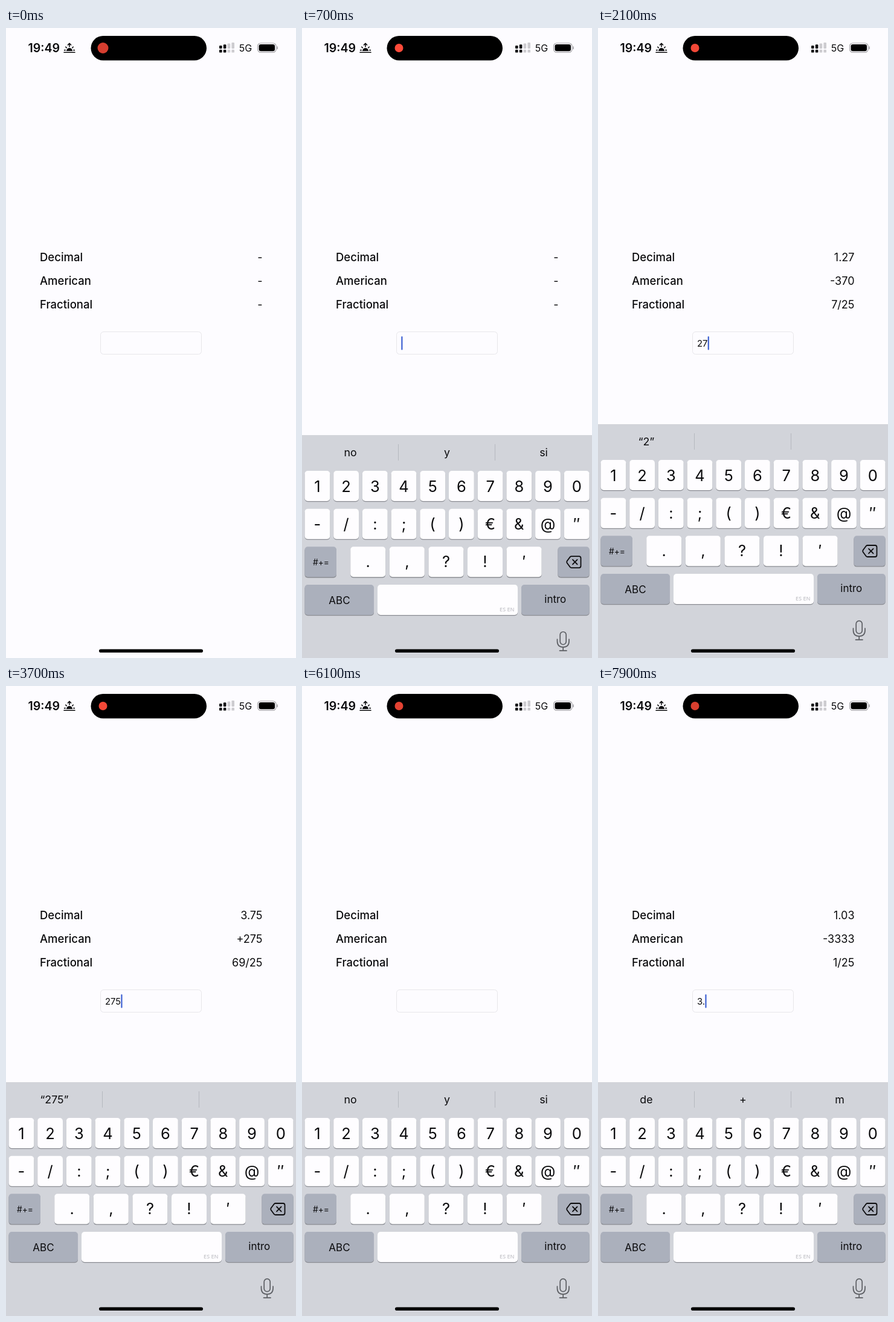
Recreate the animation shown at these times as an HTML page with a canvas. Size 480 by 1040 pixels, loop 8000 ms.

```html
<!DOCTYPE html>
<html lang="en">
<head>
<meta charset="utf-8">
<style>
html, body { margin: 0; width: 100%; height: 100%; overflow: hidden; background: #fdfcff; }
canvas { display: block; }
</style>
</head>
<body>
<canvas id="stage" width="480" height="1040"></canvas>
<script>
const ctx = document.getElementById('stage').getContext('2d');
const LOOP = 8000, PRESS = 100, LAG = 200, FOCUS = 475;
const INK = '#0b0b0d', WHITE = '#fefdff', GREY = '#abb0bc', PANEL = '#d2d4da';

// time of each entry, resulting field text, key pressed
const entries = [
  [1750, '2', '2'], [2000, '27', '7'], [2600, '275', '5'],
  [4900, '27', 'del'], [5200, '2', 'del'], [5600, '', 'del'],
  [6900, '3', '3'], [7600, '3.', '.']
];

const clamp = v => Math.max(0, Math.min(1, v));
const lastEntry = t => entries.filter(e => e[0] <= t).pop();

function text(s, x, y, size, { align = 'center', weight = 400, color = INK, family = 'Inter' } = {}) {
  ctx.font = `${weight} ${size}px "${family}", sans-serif`;
  ctx.textAlign = align;
  ctx.fillStyle = color;
  ctx.fillText(s, x, y);
}

function box(x, y, w, h, r, fill) {
  ctx.beginPath();
  ctx.roundRect(x, y, w, h, r);
  ctx.fillStyle = fill;
  ctx.fill();
}

function disc(x, y, r, fill) {
  ctx.beginPath();
  ctx.arc(x, y, r, 0, 7);
  ctx.fillStyle = fill;
  ctx.fill();
}

function stroke(d, color, width) {
  ctx.strokeStyle = color;
  ctx.lineWidth = width;
  ctx.lineCap = ctx.lineJoin = 'round';
  ctx.stroke(new Path2D(d));
}

function statusBar(t) {
  text('19:49', 36.5, 40, 19.6, { align: 'left', weight: 600 });
  stroke('M96 40.2H114M105 31V26M102.4 28L105 25.4L107.6 28M98.8 31.2L100.2 32.6M111.2 31.2L109.8 32.6M96.6 36.6H98.2M111.8 36.6H113.4', INK, 1.6);
  ctx.fillStyle = INK;
  ctx.fill(new Path2D('M100 38A5 5 0 0 1 110 38Z'));

  box(140.5, 13, 191.5, 40.5, 20.2, '#000');
  const glow = (1 - Math.cos(t / 1600 * 2 * Math.PI)) / 2;
  const r = 9 - 2 * clamp((t - 100) / 500);
  disc(160.5, 33, r, `rgb(${214 + 41 * glow},${62 + 14 * glow},${47 + 11 * glow})`);

  for (let i = 0; i < 4; i++) {
    const x = 353 + 6.8 * i, h = 5 + 1.7 * i, c = i < 2 ? INK : '#cdccd0';
    box(x, 34 - h, 4.6, h, 1.2, c);
    box(x, 35.8, 4.6, 4.8, 1.2, c);
  }
  text('5G', 396.5, 39.2, 16);
  ctx.beginPath();
  ctx.roundRect(416.5, 25, 30.5, 15.2, 5);
  ctx.strokeStyle = '#a5a4a8';
  ctx.lineWidth = 1.2;
  ctx.stroke();
  box(418.5, 27, 26.5, 11.2, 3.3, '#000');
  box(448.4, 30.2, 1.6, 5, 1, '#a5a4a8');
}

function odds(t) {
  const e = lastEntry(t);
  if (!e) return ['-', '-', '-'];
  if (!e[1]) return ['', '', ''];
  const n = parseFloat(e[1]);
  return [
    (1 + n / 100).toFixed(2),
    n >= 100 ? '+' + n : '-' + Math.round(10000 / n),
    Math.round(n / 4) + '/25'
  ];
}

function form(t) {
  const values = odds(t);
  ['Decimal', 'American', 'Fractional'].forEach((label, i) => {
    const y = 384.5 + 39.4 * i;
    text(label, 56, y, 18.5, { align: 'left', weight: 500 });
    text(values[i], 424.5, y, 18, { align: 'right' });
  });
  ctx.beginPath();
  ctx.roundRect(156.5, 501.5, 167, 37, 5);
  ctx.strokeStyle = '#e7e6ea';
  ctx.lineWidth = 1;
  ctx.stroke();

  const e = lastEntry(t), s = e ? e[1] : '';
  text(s, 164, 526, 14.8, { align: 'left' });
  if (t < FOCUS) return;
  const x = 164.3 + ctx.measureText(s).width;
  const phase = (t - (e ? e[0] : FOCUS)) % 1000 / 1000;
  ctx.globalAlpha = phase < .7 ? clamp((.5 - phase) * 10) : clamp((phase - .85) / .15);
  box(x, 509, 2.2, 22.5, 1, '#3d60d2');
  ctx.globalAlpha = 1;
}

function suggestions(t) {
  const e = lastEntry(t - LAG), s = e ? e[1] : '';
  if (!s) return ['no', 'y', 'si'];
  return s === '3.' ? ['de', '+', 'm'] : [`“${s}”`, '', ''];
}

function key(x, y, w, fill) {
  box(x, y + 1.3, w, 50, 5, '#8b8d93');
  box(x, y, w, 50, 5, fill);
}

function balloon(label, x, y, w) {
  const l = x - 15, r = x + w + 15, top = y - 61, mid = y - 12, end = y + 50;
  ctx.save();
  ctx.shadowColor = 'rgba(0,0,0,.25)';
  ctx.shadowBlur = 5;
  ctx.fillStyle = WHITE;
  ctx.fill(new Path2D(`M${l + 11} ${top}H${r - 11}Q${r} ${top} ${r} ${top + 11}V${mid - 8}
    C${r} ${mid + 8} ${x + w} ${mid + 4} ${x + w} ${y + 14}V${end - 5}Q${x + w} ${end} ${x + w - 5} ${end}
    H${x + 5}Q${x} ${end} ${x} ${end - 5}V${y + 14}C${x} ${mid + 4} ${l} ${mid + 8} ${l} ${mid - 8}
    V${top + 11}Q${l} ${top} ${l + 11} ${top}Z`));
  ctx.restore();
  text(label, x + w / 2, y - 19, 38);
}

function keyboard(t) {
  // critically damped rise
  const p = 10.7 * Math.max(0, t - 250) / 1000;
  const shift = 386 * (1 + p) * Math.exp(-p);
  ctx.save();
  ctx.translate(0, shift);
  ctx.fillStyle = PANEL;
  ctx.fillRect(0, 654, 480, 390);

  suggestions(t).forEach((s, i) => text(s, 80 + 160 * i, 689.3, 17.8));
  ctx.fillStyle = '#b5b8bf';
  ctx.fillRect(159, 669, 1, 27);
  ctx.fillRect(319, 669, 1, 27);

  const hit = entries.find(e => t >= e[0] - PRESS && t < e[0]);
  const pressed = hit && hit[2];
  let popup;
  const row = (labels, x0, y, step, w, base) => [...labels].forEach((c, i) => {
    const x = x0 + step * i;
    key(x, y, w, WHITE);
    text(c, x + w / 2, y + base, 25.5);
    if (c === pressed) popup = [c, x, y, w];
  });
  row('1234567890', 4.5, 713, 47.7, 41.8, 35);
  row('-/:;()€&@″', 4.5, 775.7, 47.7, 41.8, 34);
  row('.,?!′', 80.2, 838.3, 64.6, 58, 34);

  key(4.5, 838.3, 52.5, GREY);
  text('#+=', 31.5, 869, 13.8);
  const del = pressed === 'del';
  key(423.3, 838.3, 52.4, del ? WHITE : GREY);
  const shape = 'M446 854H458.5Q461.5 854 461.5 857V870Q461.5 873 458.5 873H446Q444.8 873 444 872.2L438.6 865Q437.8 863.5 438.6 862L444 854.8Q444.8 854 446 854Z';
  if (del) {
    ctx.fillStyle = INK;
    ctx.fill(new Path2D(shape));
  }
  stroke(shape, INK, 1.8);
  stroke('M448 859.6L455.6 867.4M455.6 859.6L448 867.4', del ? WHITE : INK, 1.8);

  key(4.5, 901, 114.5, GREY);
  text('ABC', 62, 933.2, 17);
  key(125, 901, 232, WHITE);
  text('ES EN', 351.5, 945, 9, { align: 'right', weight: 600, color: '#c6c6cb', family: 'Open Sans' });
  key(363, 901, 112.7, GREY);
  text('intro', 419.3, 930.5, 17);

  ctx.beginPath();
  ctx.roundRect(427.2, 978.7, 10, 21, 5);
  ctx.strokeStyle = '#5c5e63';
  ctx.lineWidth = 1.7;
  ctx.stroke();
  stroke('M422.5 991V994Q422.5 1004 432.2 1004Q442 1004 442 994V991M432.2 1004V1009.8M426.5 1009.8H438', '#5c5e63', 1.7);

  if (popup) balloon(...popup);
  ctx.restore();
}

function draw(now) {
  const t = now % LOOP;
  ctx.fillStyle = '#fdfcff';
  ctx.fillRect(0, 0, 480, 1040);
  statusBar(t);
  form(t);
  keyboard(t);
  box(154, 1025.5, 172, 5.6, 2.8, '#000');
}

const start = performance.now();
function tick() {
  draw(performance.now() - start);
  requestAnimationFrame(tick);
}
tick();
</script>
</body>
</html>
```
